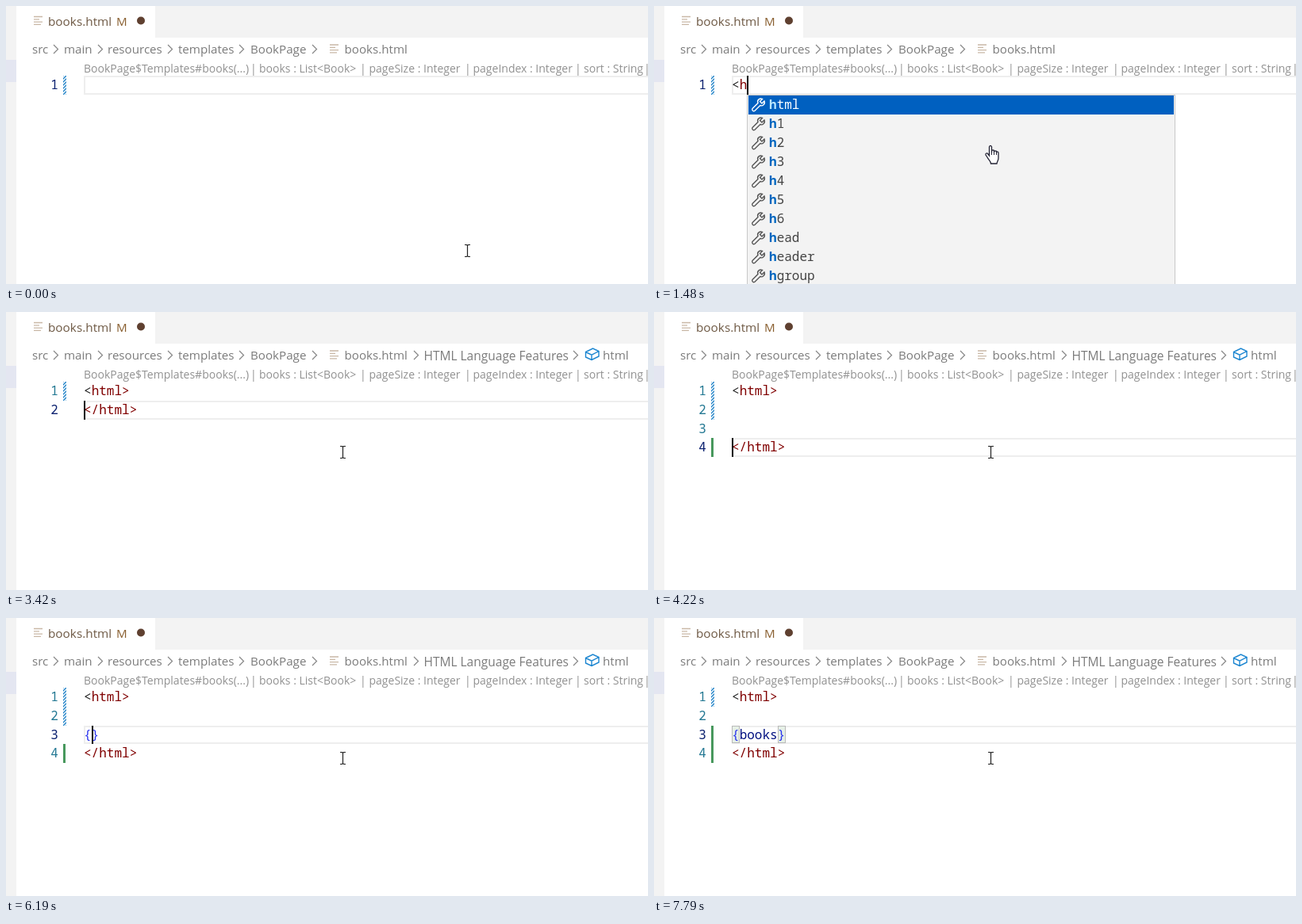
An HTML page that plays this animation: 809 by 351 pixels, repeating every 8000 ms.

```html
<!DOCTYPE html>
<html lang="en">
<head>
<meta charset="utf-8">
<title>Editor completion</title>
<style>
html, body { margin: 0; width: 100%; height: 100%; overflow: hidden; background: #fff; }
svg { display: block; width: 809px; height: 351px; }
text { font: 15.15px "Open Sans", "Noto Sans", sans-serif; white-space: pre; }
.code { font: 16.04px "Noto Sans Mono", "DejaVu Sans Mono", monospace; }
.hit { font-weight: 700; fill: #b9e5ff; }
</style>
</head>
<body>
<svg viewBox="0 0 809 351">
  <defs>
    <pattern id="hatch" width="4" height="4" patternUnits="userSpaceOnUse">
      <path d="M-1 1l2-2M0 4l4-4M3 5l2-2" stroke="#2585c9" stroke-width="1.5"/>
    </pattern>
  </defs>
  <g id="frame"></g>
  <g id="editor"></g>
  <g id="mouse"></g>
</svg>
<script>
const LOOP = 8000, LEFT = 98, CHAR = 9.62, LINE = 23.75;
const MAROON = '#800000', CURLY = '#2a34ee';
const $ = id => document.getElementById(id);
const esc = s => s.replace(/&/g, '&amp;').replace(/</g, '&lt;');
const text = (x, y, s, fill, more = '') => `<text x="${x}" y="${y}" fill="${fill}" ${more}>${esc(s)}</text>`;
const rect = (x, y, w, h, fill, more = '') => `<rect x="${x}" y="${y}" width="${w}" height="${h}" fill="${fill}" ${more}/>`;
const path = (d, stroke, width = 1, fill = 'none') =>
  `<path d="${d}" stroke="${stroke}" stroke-width="${width}" fill="${fill}"/>`;
const chevron = x => path(`M${x - 3} 49l5.5 5.5l-5.5 5.5`, '#858585', 1.2);
const fileIcon = (x, y) => path(`M${x} ${y}h11M${x} ${y + 3.3}h7M${x} ${y + 6.6}h11M${x} ${y + 9.9}h9`, '#c9b8a6', 1.3);

const tagItems = ['a', 'abbr', 'address', 'area', 'article', 'aside', 'audio', 'b', 'base', 'bdi', 'bdo', 'blockquote'];
const hItems = ['html', 'h1', 'h2', 'h3', 'h4', 'h5', 'h6', 'head', 'header', 'hgroup', 'hr'];
const dataItems = ['books', 'pageIndex', 'pageSize', 'sort', 'each', 'for', 'if', 'include', 'insert', 'let'];

const open = s => [['<', '#222'], [s, MAROON]];
const close = [['</html>', MAROON]];
const curly = (word = '', color) => [['{', CURLY], [word, color], ['}', CURLY]];
const page = mid => [open('html>'), [], mid, close];

// Each step changes only the listed parts of the editor state.
const steps = [
  [0, { lines: [[]], cur: 0, col: 0, caret: 0, lens: 1, gutter: 'h', items: null, hits: 0, crumb: 0, hand: 0, pair: null }],
  [380, { caret: 1 }],
  [840, { caret: 0 }],
  [1160, { lines: [open('')], col: 1, caret: 1, lens: 0, hand: 1 }],
  [1230, { items: tagItems }],
  [1480, { lines: [open('h')], col: 2, lens: 1, items: hItems, hits: 1 }],
  [1800, { lines: [open('ht')], col: 3, items: ['html'], hits: 2, hand: 0 }],
  [2020, { lines: [open('htm')], col: 4, hits: 3 }],
  [2170, { lines: [open('html')], col: 5, hits: 4 }],
  [2490, { crumb: 1 }],
  [2640, { lines: [open('html>')], col: 6, items: null }],
  [2810, { lines: [[...open('html>'), ...close]] }],
  [3190, { caret: 0 }],
  [3420, { lines: [open('html>'), close], cur: 1, col: 0, caret: 1 }],
  [3590, { gutter: 'hg' }],
  [3740, { lines: [open('html>'), [], close], cur: 2 }],
  [3820, { gutter: 'hgg' }],
  [3970, { lines: page([]), cur: 3 }],
  [4060, { gutter: 'hggg' }],
  [4220, { gutter: 'hh-g' }],
  [4370, { cur: 2 }],
  [4870, { caret: 0 }],
  [5330, { caret: 1 }],
  [5860, { caret: 0 }],
  [6190, { lines: page(curly()), col: 1, caret: 1 }],
  [6270, { items: dataItems, hits: 0, hand: 1 }],
  [6340, { gutter: 'h-gg' }],
  [6420, { pair: [0, 1] }],
  [6720, { caret: 0 }],
  [7180, { lines: page(curly('books', '#222')), col: 6, caret: 1, items: null, hand: 0, pair: [0] }],
  [7250, { pair: [0, 6] }],
  [7330, { lines: page(curly('books', '#001080')) }],
  [7790, { caret: 0 }]
];

function drawFrame() {
  const crumbs = [[33, 'src', 63], [73, 'main', 119], [128, 'resources', 207], [217, 'templates', 297], [308, 'BookPage', 389]];
  $('frame').innerHTML = rect(0, 0, 13, 351, '#f3f3f3') + rect(188, 0, 621, 40, '#f3f3f3') +
    rect(0, 68, 13, 28, '#e4e6f1') +
    fileIcon(35, 13.5) + text(53, 24.5, 'books.html', '#6d5843', 'style="font-size:15.3px"') +
    text(139, 24.5, 'M', '#895f30') + '<circle cx="170" cy="18.5" r="5" fill="#5f4030"/>' +
    crumbs.map(([x, s, arrow]) => text(x, 60, s, '#7b7b7b') + chevron(arrow)).join('') +
    fileIcon(408, 49) + text(426.5, 60, 'books.html', '#7b7b7b');
}

const lens = () => [[98, 'BookPage$Templates#books(...)'], [308, '|'], [319, 'books : List<Book>'], [446, '|'],
  [457.5, 'pageSize : Integer'], [578, '|'], [588.5, 'pageIndex : Integer'], [717, '|'], [728, 'sort : String'], [804, '|']]
  .map(([x, s]) => text(x, 84, s, '#919191', 'style="font-size:14px"')).join('');

const symbolCrumb = () => chevron(517) + text(526.5, 60.5, 'HTML Language Features', '#7b7b7b', 'style="font-size:15.5px"') +
  chevron(718) + path('M730.5 50.5l9-4.5l7.5 3.5v6.5l-9 4.5l-7.5-3.5zl7.5 3.7l9-4.7M738 54.2v6.3', '#1a85d0', 1.4) +
  text(752, 60, 'html', '#7b7b7b');

function popup(x, y, items, hits) {
  const rows = items.map((s, i) => {
    const top = y + 1 + 24 * i, ink = i ? '#555' : '#fff';
    return (i ? '' : rect(x + 2, top, 536, 24, '#0060c0')) +
      `<g transform="translate(${x + 14} ${top + 12})">` +
      path('M-7 4.5L0-2.5C-1.5-6 2-9 5.5-7.5L2.5-4.5L5-2L8-5C9.5-1.5 6 2 2.8.5L-4.2 7.5C-6 8.5-8 6.5-7 4.5z', ink, 1.4) + '</g>' +
      `<text class="code" x="${x + 28}" y="${top + 17}" fill="${i ? '#444' : '#fff'}">` +
      `<tspan class="hit"${i ? ' style="fill:#0066bf"' : ''}>${s.slice(0, hits)}</tspan>${s.slice(hits)}</text>`;
  });
  return rect(x + .5, y + .5, 539, 24 * items.length + 3, '#f3f3f3', 'stroke="#c8c8c8"') + rows.join('');
}

function drawEditor(s) {
  const top = s.lens ? 88 : 68;
  const lineY = i => Math.round(top + LINE * i);
  const colX = c => Math.round(LEFT + CHAR * c);
  const y = lineY(s.cur), high = lineY(s.cur + 1) - y;
  let out = rect(LEFT + 1, y + 1, 730, high - 2, 'none', 'stroke="#eee" stroke-width="2"');
  if (s.lens) out += lens();
  if (s.crumb) out += symbolCrumb();
  (s.pair || []).forEach(c => {
    out += rect(colX(c) + .5, y + .5, 9, high - 2, '#e6f0e6', 'stroke="#b9b9b9"');
  });
  s.lines.forEach((spans, i) => {
    const base = lineY(i) + 17;
    out += text(56.3, base, String(i + 1), i === s.cur ? '#0b216f' : '#237893', 'class="code"');
    out += `<text class="code" x="${LEFT}" y="${base}">` +
      spans.map(([t, c]) => `<tspan fill="${c}">${esc(t)}</tspan>`).join('') + '</text>';
    const mark = s.gutter[i], tall = lineY(i + 1) - lineY(i);
    if (mark === 'h') out += rect(72, lineY(i), 4, tall, 'url(#hatch)');
    if (mark === 'g') out += rect(72, lineY(i), 3, tall, '#48985d');
  });
  if (s.caret) out += rect(colX(s.col), y, 2, high, '#000');
  if (s.items) out += popup(colX(s.col), y + high, s.items, s.hits);
  $('editor').innerHTML = out;
}

const beam = path('M-3.5-7.5h2.5l1 1l1-1h2.5M0-6.5v13M-3.5 7.5h2.5l1-1l1 1h2.5', '#222', 1.2);
const hand = path('M-2 1C-2-1 1-1 1 1V8V6C1 4.5 4 4.5 4 6V8V7C4 5.5 7 5.5 7 7V9V8C7 6.5 9.5 6.5 9.5 8.5V15' +
  'C9.5 18 8 19 7.5 22H0C0 19-3 17-4.5 14L-6.5 11C-7 9-5 8-3.5 10L-2 12z', '#223', 1.3, '#fff') +
  path('M1 6v5M4 7v4M7 8v3', '#223');

function drawMouse(p, isHand) {
  const e = p * p * (3 - 2 * p);
  const x = 581 - 157 * e + .5, y = 309 - 132 * e;
  $('mouse').innerHTML = `<g transform="translate(${x} ${y})">${isHand ? hand : beam}</g>`;
}

let shown = '';
function tick(now) {
  const t = now % LOOP;
  const passed = steps.filter(([at]) => at <= t);
  const move = Math.max(0, Math.min(5, Math.floor((t - 70) / 77.5) + 1)) / 5;
  const key = passed.length + '/' + move;
  if (key !== shown) {
    const state = Object.assign({}, ...passed.map(([, change]) => change));
    drawEditor(state);
    drawMouse(move, state.hand);
    shown = key;
  }
  requestAnimationFrame(() => tick(performance.now() - start));
}

drawFrame();
const start = performance.now();
tick(0);
</script>
</body>
</html>
```
